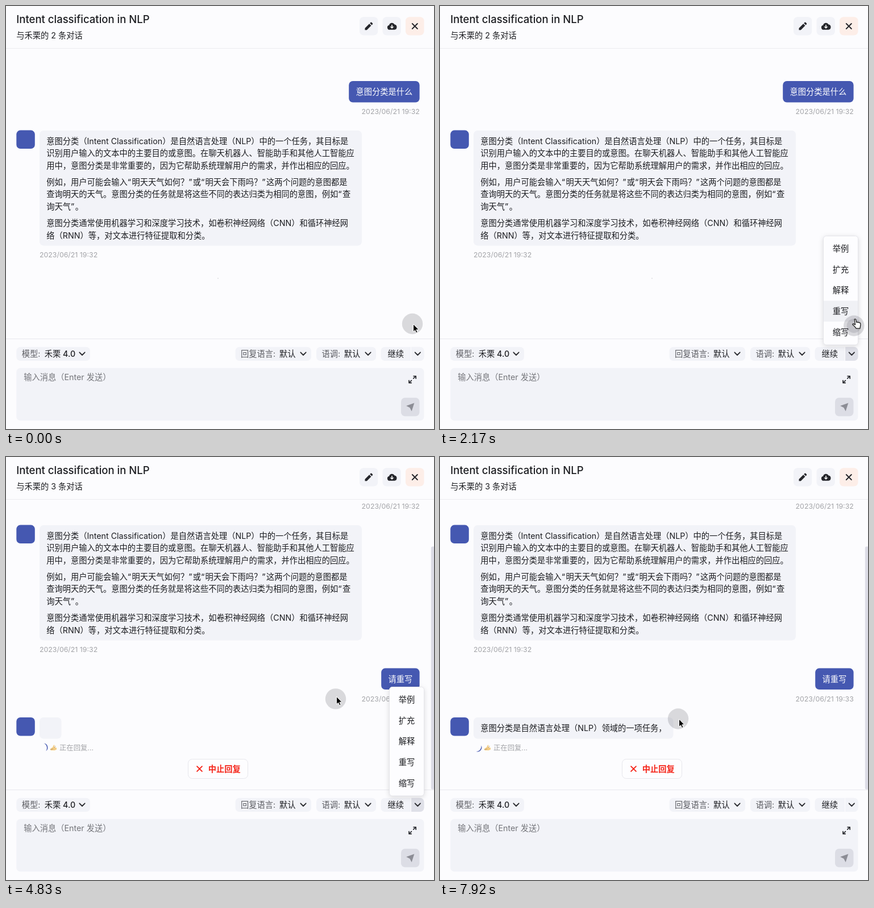
An HTML page that plays this animation: 753x744 px, repeating every 8000 ms.

```html
<!DOCTYPE html>
<html lang="zh-CN">
<head>
<meta charset="utf-8">
<title>Chat</title>
<style>
  html, body { margin: 0; width: 100%; height: 100%; overflow: hidden; background: #fcfcfe; }
  svg { display: block; width: 100vw; height: 100vh; }
  text {
    font: 14.25px Inter, "Noto Sans CJK SC", "Noto Sans CJK", sans-serif;
    fill: #1c1d21; white-space: pre;
    text-autospace: no-autospace; text-spacing-trim: space-all;
  }
  .title { font-size: 18.5px; font-weight: 500; }
  .strong { font-weight: 500; }
  .label { fill: #5d5e63; }
  .hint { fill: #74757a; }
  .small { font-size: 12.35px; fill: #a3a4a8; }
  .white { fill: #fff; }
  .stop { fill: #f5251a; font-weight: 600; }
  .quote { letter-spacing: 1.3px; }
  .end { text-anchor: end; }
  .mid { text-anchor: middle; }
  .line { fill: none; stroke: #2b2c31; stroke-width: 1.9; stroke-linecap: round; stroke-linejoin: round; }
  #menuPanel { filter: drop-shadow(0 2px 4px #0002); }
</style>
</head>
<body>
<svg id="stage" viewBox="0 0 753 744" preserveAspectRatio="none"></svg>
<script>
const LOOP = 8000, OPEN = 2080, SEND = 3330, CLOSE = 5080, REPLY = 6830;
const BLUE = '#4558b1', PALE = '#f2f3f8';
const SCROLL = 99, ROW_TOP = 408.7, ROW_HEIGHT = 36.6;

const box = (x, y, w, h, fill, r = 7, extra = '') =>
  `<rect x="${x}" y="${y}" width="${w}" height="${h}" rx="${r}" fill="${fill}" ${extra}/>`;
const text = (x, y, str, cls = '', extra = '') =>
  `<text x="${x}" y="${y}" class="${cls}" ${extra}>${str.replace(/[“”]/g, '<tspan class="quote">$&</tspan>')}</text>`;
const chevron = x => `<path class="line" d="M${x - 4.6} 609.3l4.6 4.7 4.6-4.7"/>`;
const cross = (x, y, r, color) =>
  `<path class="line" style="stroke:${color}" d="M${x - r} ${y - r}l${2 * r} ${2 * r}m0 ${-2 * r}l${-2 * r} ${2 * r}"/>`;
const avatar = y => box(18.3, y, 32.5, 32.5, BLUE);
const select = (x, w, label, valueX, value) =>
  box(x, 599.7, w, 24.3, PALE) + text(x + 9.4, 616.8, label, 'label') +
  text(valueX, 616.8, value, 'strong') + chevron(x + w - 14);

const answer = [
  [243, '意图分类（Intent Classification）是自然语言处理（NLP）中的一个任务，其目标是'],
  [264.3, '识别用户输入的文本中的主要目的或意图。在聊天机器人、智能助手和其他人工智能应'],
  [285.7, '用中，意图分类是非常重要的，因为它帮助系统理解用户的需求，并作出相应的回应。'],
  [315, '例如，用户可能会输入“明天天气如何？”或“明天会下雨吗？”这两个问题的意图都是'],
  [336.4, '查询明天的天气。意图分类的任务就是将这些不同的表达归类为相同的意图，例如“查'],
  [357.8, '询天气”。'],
  [387.2, '意图分类通常使用机器学习和深度学习技术，如卷积神经网络（CNN）和循环神经网'],
  [408.6, '络（RNN）等，对文本进行特征提取和分类。'],
];

const history = `<g id="history">
  ${box(603.2, 132, 124.4, 37.6, BLUE)}${text(615.6, 156.3, '意图分类是什么', 'white')}
  ${text(727.8, 190, '2023/06/21 19:32', 'small end')}
  ${avatar(218.6)}${box(59, 219, 567, 202.4, PALE)}
  ${answer.map(([y, line]) => text(71.3, y, line)).join('')}
  ${text(59, 442.2, '2023/06/21 19:32', 'small')}</g>
  <circle id="dot" cx="373" cy="479" r=".9" fill="#dadade"/>`;

const exchange = `<g id="exchange">
  ${box(747.8, 157.5, 8, 427, '#dcdce6', 2.6)}
  ${box(660.2, 371.6, 67.4, 37.4, BLUE)}${text(672.6, 395.8, '请重写', 'white')}
  ${text(727.8, 429.6, '2023/06/21 19:33', 'small end')}
  ${avatar(458)}${box(59, 458, 38.5, 37.5, PALE, 7, 'id="bubble"')}
  ${text(71.3, 482.4, '意图分类是自然语言处理（NLP）领域的一项任务，', '', 'id="reply"')}
  <path id="spinner" fill="${BLUE}" d="M2.6-7A7.5 7.5 0 0 1 2.6 7A9.2 9.2 0 0 0 2.6-7z"/>
  <path d="M78 513.2l4-2.6 2.2-4.4 1.3.7-.8 3.3 4.3 1.4v2.8l-3.3 1.6h-7z" fill="#f4cd85"/>
  <path d="M78 514.6l5-1.2M84.8 511.6l2.4-3.4" stroke="#a98d68" stroke-width=".8" fill="none"/>
  ${text(94, 515.8, '正在回复...', 'small')}
  ${box(320.5, 531.5, 105, 34, '#fdfdff', 7, 'stroke="#e7e7ec"')}
  ${cross(340.5, 548.5, 4.4, '#f5251a')}${text(355.8, 553.8, '中止回复', 'stop')}</g>`;

const header = `
  ${box(0, 0, 753, 74, '#fcfcfe', 0)}${box(0, 74, 753, 1, '#ebebf0', 0)}
  ${text(18.3, 29.8, 'Intent classification in NLP', 'title')}
  ${text(18.3, 57.2, '', '', 'id="count"')}
  ${box(622, 19.2, 32.3, 32.3, PALE)}${box(662.5, 19.2, 32.3, 32.3, PALE)}${box(703, 19.2, 32.5, 32.3, '#fdeee8')}
  <path fill="#25262b" d="M631.5 42.2v-3.3l7.7-7.7 3.3 3.3-7.7 7.7zM640.2 30.2l1.5-1.4q.8-.6 1.5 0l1.8 1.8q.6.8 0 1.5l-1.5 1.4z"/>
  <path fill="#25262b" d="M675 41.8a4.1 4.1 0 0 1-.9-8.1 5.1 5.1 0 0 1 9.5-1.2 4.7 4.7 0 0 1-.2 9.3z"/>
  <path fill="none" stroke="#fff" stroke-width="1.5" d="M679 33v5.5m-2.6-2.3l2.6 2.6 2.6-2.6"/>
  ${cross(719.3, 35.5, 4.5, '#25262b')}`;

const footer = `
  ${box(0, 585, 753, 159, '#fcfcfe', 0)}${box(0, 585, 753, 1, '#e8e8ed', 0)}
  ${select(18.3, 129.7, '模型:', 67.8, '禾栗 4.0')}
  ${select(403.5, 133.5, '回复语言:', 481, '默认')}
  ${select(546, 105, '语调:', 594.8, '默认')}
  ${box(659.5, 599.7, 76, 24.3, PALE)}
  <path id="toggle" d="M713 599.7h15.5a7 7 0 0 1 7 7v10.3a7 7 0 0 1-7 7H713z" fill="${PALE}"/>
  ${box(712, 599.7, 1, 24.3, '#fcfcfe', 0)}
  ${text(671.5, 616.8, '继续', 'strong')}${chevron(724.3)}
  ${box(18.3, 636.8, 717.2, 92.4, PALE)}
  ${text(31.3, 658, '输入消息（Enter 发送）', 'hint')}
  <path class="line" style="stroke-width:1.7" d="M716.8 655.2l4-4m-3.8-.2h4.2v4.2M713.4 658.6l-4 4m3.8.2H709v-4.2"/>
  ${box(695, 689, 32.5, 32.5, '#dcdde5')}
  <path fill="#8c8d95" d="M718.3 698.3l-4.6 14.4-3.3-6.2-6.2-3.3z"/>`;

const menu = `<g id="menu"><g id="menuPanel">
  ${box(674.5, 404.5, 61, 191.5, '#fdfdff', 5, 'stroke="#e5e5ea"')}</g>
  ${box(675, 0, 60, ROW_HEIGHT, '#f0f1f5', 0, 'id="hover"')}
  ${['举例', '扩充', '解释', '重写', '缩写'].map((s, i) =>
    text(705, 432.2 + i * ROW_HEIGHT, s, 'mid')).join('')}</g>`;

const pointer = `
  <g id="halo"><circle r="18.2" fill="#23232e" opacity=".16"/><circle id="press" r="12.5" fill="#23232e" opacity=".12"/></g>
  <g id="ime">${box(737.5, 616.5, 22, 25, '#fdfdff', 3, 'stroke="#dedee3"')}${box(741, 621.5, 16, 15.5, '#111', 3)}</g>
  <g id="cursor" stroke-linejoin="round">
    <path id="arrow" d="M1.5 .5v13.6l3.1-2.9 2.1 4.7 2.3-1-2.1-4.6h4.2z" fill="#000" stroke="#fff"/>
    <path id="hand" fill="#fff" stroke="#111" stroke-width="1.2" d="M-.6 1.6q1.3-1.6 2.4.2l1.2 5q1.5-1.3 2.5.3 1.5-1 2.4.5 1.8-.5 2.1 1.3.4 3-.3 5l-.6 3.6H2.4Q.5 14-3.5 11.2q-.8-2 1.3-1.9L.8 11z"/>
  </g>`;

const stage = document.getElementById('stage');
stage.innerHTML = history + exchange + header + footer + menu + pointer;
const el = id => document.getElementById(id);
const show = (id, on) => { el(id).style.display = on ? '' : 'none'; };
const move = (id, x, y, angle = 0) =>
  el(id).setAttribute('transform', `translate(${x} ${y}) rotate(${angle})`);

// Pointer waypoints: time, x, y
const route = [
  [0, 715, 559], [250, 715, 559], [670, 725, 605], [1000, 722, 602.5], [1250, 723, 609],
  [1800, 723, 609], [2350, 733, 521], [2520, 733, 521], [2670, 705, 539], [3480, 705, 538],
  [3580, 686, 531], [3680, 635, 508], [4200, 622, 506], [4560, 602, 489], [4740, 580, 426],
  [4830, 580, 421], [4920, 578, 414], [5340, 577, 461], [5500, 577, 461], [6100, 419, 460.5],
  [LOOP, 419, 460.5],
];
function pointerAt(time) {
  const t = Math.max(0, time);
  const i = Math.max(1, route.findIndex(p => p[0] >= t));
  const [t0, x0, y0] = route[i - 1], [t1, x1, y1] = route[i];
  const k = (t - t0) / (t1 - t0);
  return [x0 + (x1 - x0) * k, y0 + (y1 - y0) * k];
}

function draw(t) {
  const sent = t >= SEND, open = t >= OPEN && t < CLOSE, replied = t >= REPLY;
  const [x, y] = pointerAt(t);
  const inMenu = open && x > 675 && x < 735 && y > 404 && y < 596;
  const onToggle = x > 713 && x < 735.5 && y > 600 && y < 624;
  const row = Math.floor((y - ROW_TOP) / ROW_HEIGHT);

  move('history', 0, sent ? -SCROLL : 0);
  show('dot', !sent);
  show('exchange', sent);
  el('count').textContent = `与禾栗的 ${sent ? 3 : 2} 条对话`;
  el('bubble').setAttribute('width', replied ? 351.5 : 38.5);
  show('reply', replied);
  move('spinner', 66, 511, -45 + (t - 3580) / 600 * 360);

  show('menu', open);
  show('hover', inMenu && row >= 0 && row < 5);
  el('hover').setAttribute('y', ROW_TOP + row * ROW_HEIGHT);
  el('toggle').setAttribute('fill', open || onToggle ? '#dfe0e8' : PALE);

  move('halo', ...pointerAt(t - 80));
  show('press', (t > 1990 && t < 2200) || (t > 3250 && t < 3680));
  move('cursor', x, y);
  show('hand', inMenu || onToggle);
  show('arrow', !inMenu && !onToggle);
  show('ime', t >= 1170 && t < 1900);
}

function tick() {
  draw(performance.now() % LOOP);
  requestAnimationFrame(tick);
}
tick();
</script>
</body>
</html>
```
